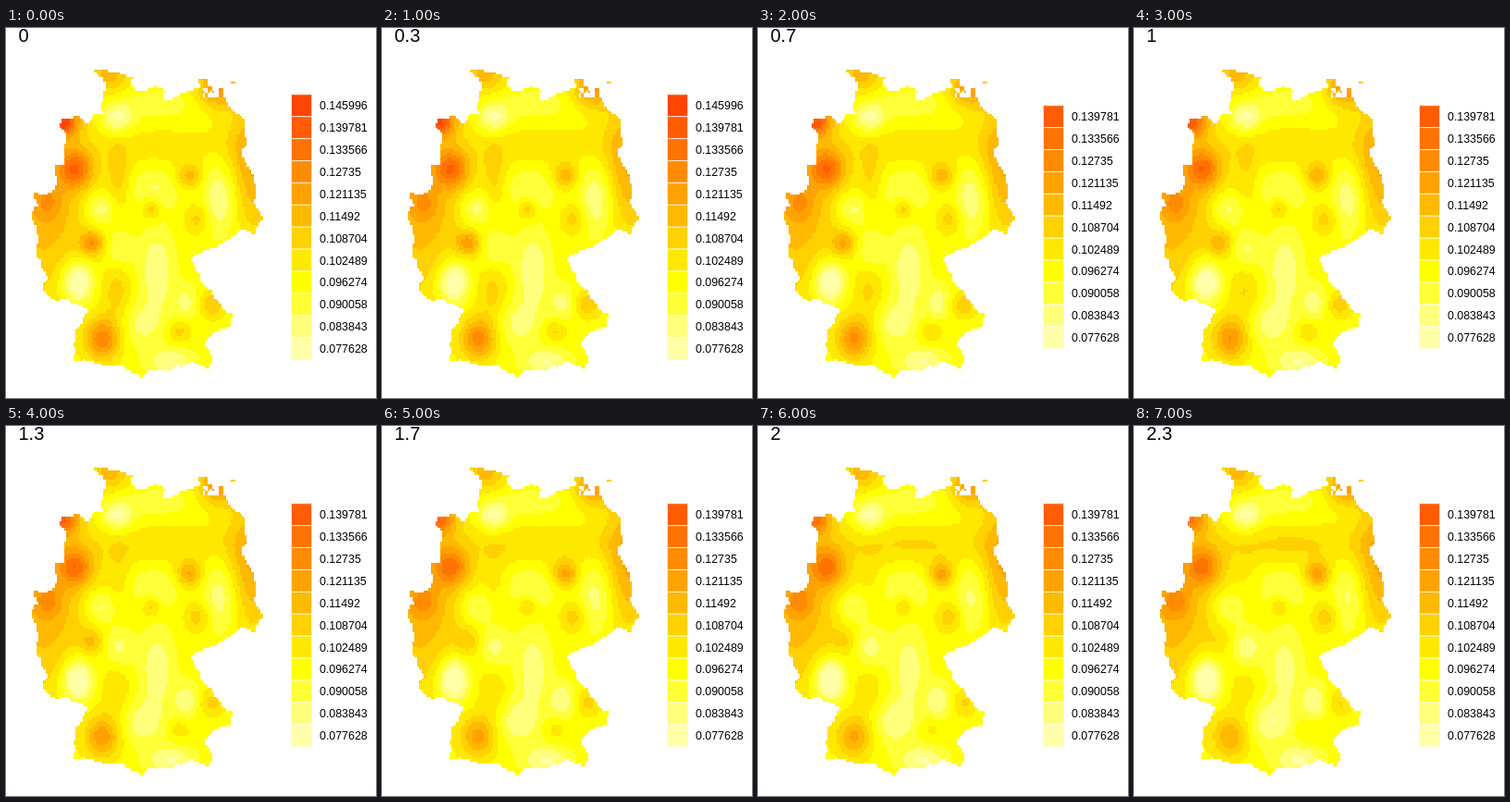
Write an HTML page with a canvas that moves like this. It is 400 px wide and 400 px high and loops after 8 s.

```html
<!DOCTYPE html>
<html lang="en">
<head>
<meta charset="utf-8">
<style>
html, body { margin: 0; width: 100%; height: 100%; overflow: hidden; background: #fff; }
canvas { display: block; width: 400px; height: 400px; }
</style>
</head>
<body>
<canvas id="map" width="400" height="400"></canvas>
<script>
const ctx = document.getElementById('map').getContext('2d');
const STEP = 1000, STEPS = 8, CELL = 2.5;
const FONT = '"Liberation Sans", Arial, sans-serif';

// Level 0 is the palest tone, level 11 the reddest.
const tone = i => i < 3
  ? `rgb(255,255,${[168, 124, 56][i]})`
  : `rgb(255,${Math.round(255 * (14 - i) / 11)},0)`;

let seed = 7;
const rand = () => (seed = seed * 16807 % 2147483647) / 2147483647;

// Key points of the border, roughened below
const border = `95,44 103,53 108,62 105,75 104,92 94,94 87,105 80,95 61,97 57,107 66,113 62,134
  63,146 52,148 55,166 50,177 28,179 35,191 27,205 34,222 33,246 39,262 45,270 40,284 50,293
  72,297 88,305 78,322 73,340 71,361 95,361 126,365 147,377 153,371 184,366 202,360 220,368
  223,354 214,343 230,327 243,322 245,309 226,291 214,279 204,258 200,248 232,233 257,216
  270,222 278,206 269,192 270,172 262,150 254,135 261,126 256,105 257,97 243,88 235,74 217,66
  205,66 192,70 176,78 168,76 172,67 162,62 146,68 134,60 137,53 120,47`
  .trim().split(/\s+/).map(p => p.split(',').map(Number));

// Splits every edge and pushes its middle sideways.
const roughen = pts => pts.flatMap(([x, y], i) => {
  const [u, v] = pts[(i + 1) % pts.length], k = (rand() - .5) * .28;
  return [[x, y], [(x + u) / 2 + (v - y) * k, (y + v) / 2 - (u - x) * k]];
});

const land = new Path2D('M' + roughen(roughen(border)).join(' ') + 'Z');
// Small islands off the north-east coast
for (let i = 0; i < 14; i++) {
  land.rect(208 + 34 * rand(), 56 + 16 * rand(), 3 + 4 * rand(), 3 + 3 * rand());
}

const cells = [];
for (let y = 40; y < 380; y += CELL) {
  for (let x = 22.5; x < 285; x += CELL) {
    if (ctx.isPointInPath(land, x + CELL / 2, y + CELL / 2)) cells.push([x, y]);
  }
}

// Each bump: x, y, radius, height at start, height at end, vertical stretch
const bumps = [
  [62, 100, 12, 7, 4.5],
  [75, 152, 13, 5, 4.3, 1.1],
  [45, 189, 11, 1.8, 2.2, 1.2],
  [93, 233, 9, 4, .6],
  [77, 274, 12, -4.6, -5.2, 1.4],
  [101, 195, 13, -2.6, -2.2],
  [122, 161, 9, 1.8, .4, 3],
  [112, 48, 15, 3, 3],
  [120, 97, 12, -3, -3],
  [165, 82, 28, -1.1, -1.1, .4],
  [170, 128, 60, 1, 1.7, .25],
  [228, 64, 15, 4.6, 4],
  [198, 160, 10, 3, 4.2],
  [160, 174, 20, -1.6, -1.4, .8],
  [157, 195, 7, 2.6, 2, 1.2],
  [207, 206, 10, 2, 2.3, 1.2],
  [233, 184, 14, -2.9, -2.2, 2],
  [163, 262, 13, -2.5, -2.1, 2.3],
  [121, 240, 12, -1.8, -2.5, 1.4],
  [120, 284, 11, 1.9, 1, 2.2],
  [104, 336, 13, 5.2, 3.4, 1.2],
  [147, 320, 17, -1.8, -2.4],
  [195, 297, 10, -1.8, -2.5, 1.4],
  [187, 327, 9, 2, .8],
  [222, 299, 10, 2.5, 1.6],
  [178, 361, 18, -2.5, -2.7, .6]
];

const bell = (x, y) => Math.exp(-(x * x + y * y) / 2);

function heightAt(x, y, p) {
  // Warm western and eastern borders over an even base
  let h = 3.5 + 3.1 * bell((x - 40) / 38, (y - 190) / 75) + 3.7 * bell((x - 266) / 20, (y - 148) / 50);
  for (const [bx, by, r, a, b, tall = 1] of bumps) {
    h += (a + (b - a) * p) * bell((x - bx) / r, (y - by) / (r * tall));
  }
  return h;
}

function drawMap(p, top) {
  for (const [x, y] of cells) {
    const level = Math.floor(heightAt(x + CELL / 2, y + CELL / 2, p));
    const l = Math.round(x), t = Math.round(y);
    ctx.fillStyle = tone(Math.max(0, Math.min(top, level)));
    ctx.fillRect(l, t, Math.round(x + CELL) - l, Math.round(y + CELL) - t);
  }
}

function drawLegend(top) {
  const pitch = 23.9, y0 = 215.2 - (top + 1) * pitch / 2;
  ctx.font = '12.4px ' + FONT;
  ctx.strokeStyle = 'rgba(255,250,240,.8)';
  for (let i = top; i >= 0; i--) {
    const y = y0 + (top - i) * pitch;
    ctx.fillStyle = tone(i);
    ctx.fillRect(308, y, 23, pitch);
    ctx.strokeRect(308.5, y, 22, pitch);
    ctx.fillStyle = '#000';
    ctx.fillText(+(.0776277 + i * .00621532).toFixed(6), 339, y + 16.4);
  }
}

function draw(k) {
  const top = k < 2 ? 11 : 10;
  ctx.fillStyle = '#fff';
  ctx.fillRect(0, 0, 400, 400);
  drawMap(k / (STEPS - 1), top);
  drawLegend(top);
  ctx.fillStyle = '#000';
  ctx.font = '20px ' + FONT;
  ctx.fillText(+(k / 3).toFixed(1), 13.5, 15);
}

let shown = -1;
function tick() {
  const k = Math.floor(performance.now() / STEP) % STEPS;
  if (k !== shown) draw(shown = k);
  requestAnimationFrame(tick);
}
tick();
</script>
</body>
</html>
```
